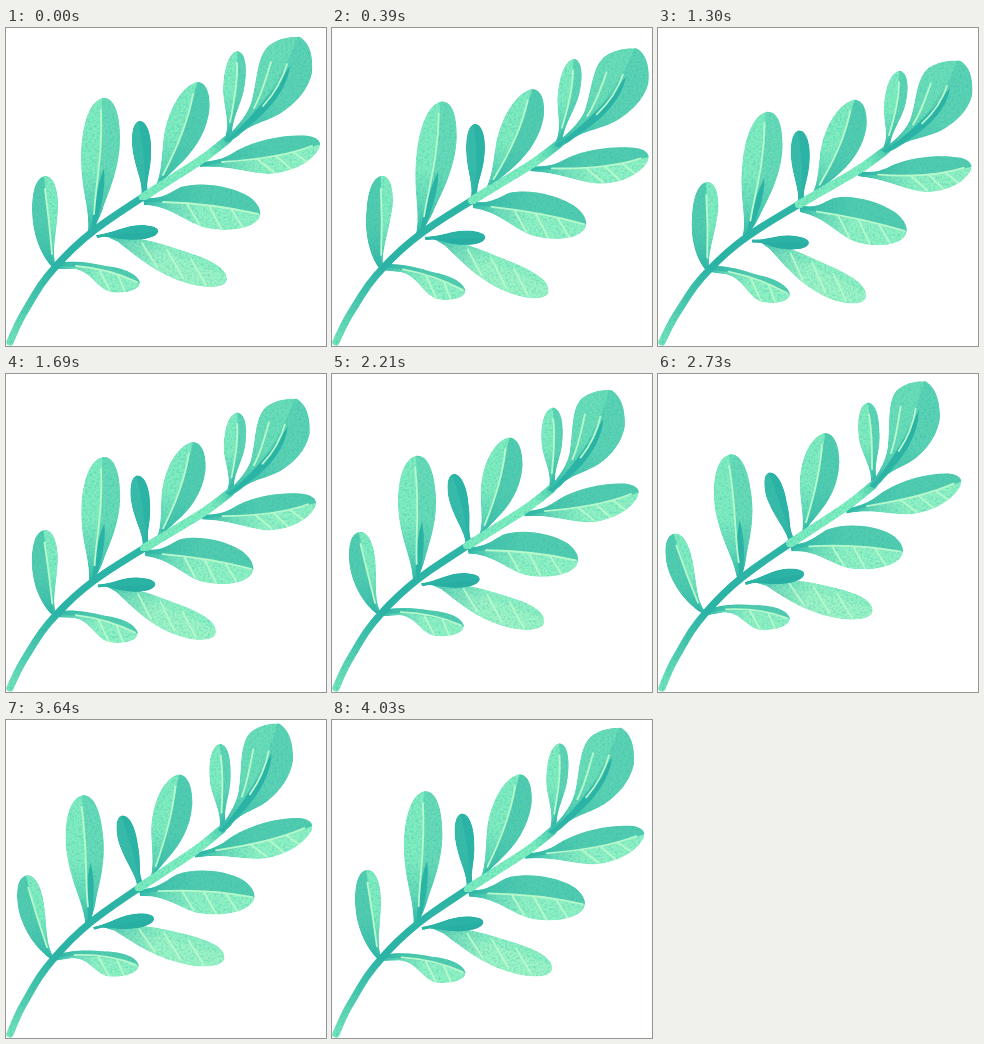
An HTML page for the animation above (4160 ms loop, 320 px wide and 318 px high).

```html
<!DOCTYPE html>
<html lang="en">
<head>
<meta charset="utf-8">
<title>Swaying branch</title>
<style>
html, body { margin: 0; width: 100%; height: 100%; overflow: hidden; background: #fff; }
svg { display: block; width: 100vw; height: 100vh; }
</style>
</head>
<body>
<svg id="stage" viewBox="0 0 320 318">
  <defs>
    <filter id="grain" color-interpolation-filters="sRGB" x="-5%" y="-5%" width="110%" height="110%">
      <feTurbulence type="fractalNoise" baseFrequency=".45" numOctaves="2" seed="4"/>
      <feColorMatrix values="0 0 0 0 .14  0 0 0 0 .68  0 0 0 0 .63  .8 0 0 0 -.34"/>
      <feComposite in2="SourceGraphic" operator="atop"/>
    </filter>
    <linearGradient id="lower" gradientUnits="userSpaceOnUse" x1="4" y1="314" x2="137" y2="169">
      <stop offset="0" stop-color="#70e3ba"/>
      <stop offset=".25" stop-color="#46c5ad"/>
      <stop offset=".45" stop-color="#2bb3a6"/>
      <stop offset="1" stop-color="#2db5a6"/>
    </linearGradient>
    <linearGradient id="upper" gradientUnits="userSpaceOnUse" x1="137" y1="169" x2="222" y2="111">
      <stop offset="0" stop-color="#7cecbf"/>
      <stop offset=".75" stop-color="#80efc0"/>
      <stop offset="1" stop-color="#4acbae"/>
    </linearGradient>
  </defs>
</svg>
<script>
const NS = "http://www.w3.org/2000/svg";
const STEP = 130, STEPS = 32;
const stage = document.getElementById("stage");
const DARK = "#2bb3a6", TEAL = "#52ccb0", MINT = "#80ecc0", LIGHT = "#8ff1c4", PALE = "#b8f9cc";

// Two shared curves: side-to-side sway and downward sag
const TIMES = [0, 7, 13, 17, 21, 25, 31];
const SWAY = [0, 1, 0, -.62, -1.25, -1.55, -.22];
const SAG = [0, 1, 1, .9, .8, .65, .1];

// Stem in its rest pose
const STEM = [[4, 314], [12, 295], [22, 278], [35, 256], [49, 239], [67, 220],
  [88, 202], [111, 186], [137, 169], [178, 143], [200, 129], [222, 111]];

// u: tip offset for full sway, v: tip offset for full sag
const LEAVES = [
  { base: [48, 238], tip: [39, 148], u: [17.5, -4], v: [-.5, 8], fill: TEAL, half: MINT,
    shape: "M45 238C36 228 26 208 26 182C26 160 31 149 39 148C48 148 52 162 52 178C51 205 45 222 50 238Z",
    side: "M47 238C45 210 42 185 38 148L60 148L60 238Z", vein: "M46 226C44 202 42 184 39 161" },
  { base: [86, 203], tip: [97, 70], u: [20, 0], v: [0, 13], fill: MINT, half: "#67dab7",
    shape: "M82 203C84 180 74 160 75 125C76 95 84 72 97 70C109 69 114 88 114 110C114 140 102 165 97 180C92 195 88 198 88 204Z",
    side: "M85 205C90 165 97 120 96 68L125 68L125 205Z", vein: "M88 186C90 155 97 125 95 82",
    blade: "M85 204C88 175 92 155 98 140C100 160 95 180 88 204Z" },
  { base: [139, 167], tip: [133, 93], u: [16, 1], v: [-2, 8.5], fill: "#38bba9", half: DARK,
    shape: "M135 168C138 155 128 140 126 118C125 102 128 94 133 93C141 92 146 108 145 125C145 145 138 155 143 168Z",
    side: "M139 168C140 140 137 115 132 93L155 93L155 168Z" },
  { base: [149, 162], tip: [190, 54], u: [16.5, 5], v: [-4.5, 14], fill: MINT, half: TEAL,
    shape: "M147 163C155 150 155 135 157 115C159 90 172 60 190 54C202 53 205 70 203 85C199 108 186 125 172 138C163 147 156 152 151 162Z",
    side: "M148 164C165 130 180 100 192 52L220 52L220 164Z", vein: "M157 147C170 122 182 95 187 66" },
  { base: [222, 108], tip: [231, 23], u: [17, 5.5], v: [0, 15.5], fill: MINT, half: "#5fd4b5",
    shape: "M219 109C224 95 218 80 217 65C217 42 222 25 231 23C240 24 241 40 239 55C237 75 225 90 226 108Z",
    side: "M222 109C227 80 232 50 231 22L250 22L250 109Z", vein: "M224 94C228 75 232 55 231 35" },
  { base: [198, 135], tip: [314, 113], u: [6, 15], v: [-4, 12.5], fill: LIGHT, half: TEAL,
    shape: "M194 134C215 133 222 128 232 122C255 110 285 106 303 108C313 110 316 115 313 121C305 135 285 145 262 146C240 145 222 137 194 139Z",
    side: "M194 137C235 134 270 130 315 116L315 95L194 95Z",
    vein: "M216 134C248 132 280 128 306 118M251 131L268 144M270 128L285 141M287 124L301 134" },
  { base: [139, 173], tip: [255, 187], u: [3, 12.5], v: [-7, 9], fill: LIGHT, half: TEAL,
    shape: "M137 170C155 172 163 165 175 159C195 153 225 158 242 168C254 176 257 186 252 192C243 202 220 204 200 200C180 195 165 178 138 177Z",
    side: "M137 174C185 174 220 178 257 187L257 145L137 145Z",
    vein: "M157 174C190 175 222 179 252 186M181 176L193 196M203 178L216 202M225 181L238 201" },
  { base: [97, 207], tip: [220, 255], u: [-2, 16], v: [-11, 7], fill: "#9cf3c6", half: "#8ff0c3",
    shape: "M95 206C115 208 140 210 165 219C190 227 222 236 221 252C219 262 195 260 180 255C150 246 130 228 112 214Z",
    side: "M95 208C130 213 165 228 221 248L221 200L95 200Z",
    vein: "M136 215L151 239M161 222L177 250M185 231L200 257" },
  { base: [95, 207], tip: [153, 202], u: [3, 7], v: [-3, 7], fill: DARK, half: "#28aea3",
    shape: "M90 207C108 205 118 197 135 197C147 197 154 200 152 204C150 211 130 213 116 211C108 210 102 207 91 210Z",
    side: "M92 209C115 206 135 206 153 203L153 220L92 220Z" },
  { base: [51, 238], tip: [133, 259], u: [.3, 11], v: [-2, 4.5], fill: LIGHT, half: TEAL,
    shape: "M49 235C70 232 85 235 100 238C118 240 132 246 134 255C133 264 115 266 104 264C90 260 85 243 68 241L49 241Z",
    side: "M49 238C80 238 105 244 134 255L134 225L49 225Z",
    vein: "M70 238C92 240 114 246 131 254M94 243L104 263M112 247L119 264" },
  { base: [221, 111], tip: [295, 9], u: [19, 11.5], v: [-3, 16], fill: "#6addb8", half: "#5bd2b4",
    shape: "M217 112C225 105 240 90 245 75C251 55 250 30 262 18C272 10 285 8 294 9C305 16 307 30 306 45C302 62 290 75 275 85C258 95 245 95 232 108L222 115Z",
    side: "M220 113C250 85 275 55 292 8L320 8L320 115Z",
    blade: "M219 114C240 94 262 72 284 38C281 62 262 85 234 105Z",
    vein: "M265 34C260 50 256 66 248 80M281 36C276 54 266 68 257 78" }
];

function set(el, attrs) {
  for (const key in attrs) el.setAttribute(key, attrs[key]);
}

function add(parent, tag, attrs) {
  const el = document.createElementNS(NS, tag);
  set(el, attrs);
  parent.append(el);
  return el;
}

function addStem(paint, width) {
  return add(stage, "path", { fill: "none", stroke: `url(#${paint})`, "stroke-width": width,
    "stroke-linecap": "round", filter: "url(#grain)" });
}

function addLeaf(leaf, i) {
  const defs = stage.querySelector("defs");
  const clip = `url(#clip${i})`;
  leaf.parts = [];
  const part = (parent, d, attrs) => d && leaf.parts.push({ d, el: add(parent, "path", attrs) });

  part(add(defs, "clipPath", { id: "clip" + i }), leaf.shape, {});
  leaf.shade = add(defs, "linearGradient", { id: "shade" + i, gradientUnits: "userSpaceOnUse" });
  [[0, .9], [.35, .35], [.8, 0]].forEach(([offset, alpha]) =>
    add(leaf.shade, "stop", { offset, "stop-color": DARK, "stop-opacity": alpha }));

  const body = add(add(stage, "g", { filter: "url(#grain)" }), "g", { "clip-path": clip });
  part(body, leaf.shape, { fill: leaf.fill });
  part(body, leaf.side, { fill: leaf.half });
  part(body, leaf.shape, { fill: `url(#shade${i})` });
  part(body, leaf.blade, { fill: DARK });
  part(stage, leaf.vein, { fill: "none", stroke: PALE, "stroke-width": 1.8,
    "stroke-linecap": "round", "clip-path": clip });
}

// Periodic cubic interpolation over unevenly spaced keys
function curve(values, t) {
  const n = TIMES.length;
  const at = i => values[(i + n) % n];
  const time = i => TIMES[(i + n) % n] + STEPS * Math.floor(i / n);
  const rate = i => (at(i + 1) - at(i)) / (time(i + 1) - time(i));
  const slope = i => {
    const h0 = time(i) - time(i - 1), h1 = time(i + 1) - time(i);
    return (rate(i - 1) * h1 + rate(i) * h0) / (h0 + h1);
  };
  let i = 0;
  while (i < n - 1 && t >= TIMES[i + 1]) i++;
  const h = time(i + 1) - time(i), s = (t - time(i)) / h, r = 1 - s;
  return at(i) * r * r * (1 + 2 * s) + at(i + 1) * s * s * (3 - 2 * s)
    + h * (slope(i) * s * r * r - slope(i + 1) * s * s * r);
}

const mix = (u, v, sway, sag) => [u[0] * sway + v[0] * sag, u[1] * sway + v[1] * sag];
const sum = (p, q) => [p[0] + q[0], p[1] + q[1]];

// Offset of a stem point; it grows with the distance from the root
function bend(p, sway, sag) {
  const k = Math.max(0, p[0] - 4) / 218, q = k ** .75;
  return mix([6.5 * q, 5 * k], [2 * k, 7.5 * q], sway, sag);
}

function smooth(points) {
  let d = "M" + points[0];
  for (let i = 1; i < points.length - 1; i++) {
    const [x, y] = points[i], [nx, ny] = points[i + 1];
    d += `Q${x} ${y} ${(x + nx) / 2} ${(y + ny) / 2}`;
  }
  return d + "L" + points[points.length - 1];
}

// Bend a leaf between its base and tip offsets, most strongly near the base
function pose(leaf, sway, sag) {
  const [bx, by] = leaf.base;
  const dx = leaf.tip[0] - bx, dy = leaf.tip[1] - by, len = dx * dx + dy * dy;
  const low = bend(leaf.base, sway, sag), high = mix(leaf.u, leaf.v, sway, sag);
  const warp = (_, x, y) => {
    const s = ((x - bx) * dx + (y - by) * dy) / len;
    const f = s * (1.5 - .5 * s);
    const move = i => low[i] + (high[i] - low[i]) * f;
    return `${(+x + move(0)).toFixed(2)} ${(+y + move(1)).toFixed(2)}`;
  };
  for (const { d, el } of leaf.parts) set(el, { d: d.replace(/([\d.]+) ([\d.]+)/g, warp) });
  const [x1, y1] = sum(leaf.base, low), [x2, y2] = sum(leaf.tip, high);
  set(leaf.shade, { x1, y1, x2: x1 + (x2 - x1) * .6, y2: y1 + (y2 - y1) * .6 });
}

const last = LEAVES.length - 1;
LEAVES.slice(0, last).forEach(addLeaf);
const lower = addStem("lower", 7.2);
const upper = addStem("upper", 8.5);
addLeaf(LEAVES[last], last);

function draw(step) {
  const sway = curve(SWAY, step), sag = curve(SAG, step);
  const points = STEM.map(p => sum(p, bend(p, sway, sag)));
  set(lower, { d: smooth(points.slice(0, 9)) });
  set(upper, { d: smooth(points.slice(8)) });
  LEAVES.forEach(leaf => pose(leaf, sway, sag));
}

const start = performance.now();
let shown = -1;
function tick() {
  const step = Math.floor((performance.now() - start) / STEP) % STEPS;
  if (step !== shown) draw(shown = step);
  requestAnimationFrame(tick);
}
tick();
</script>
</body>
</html>
```
